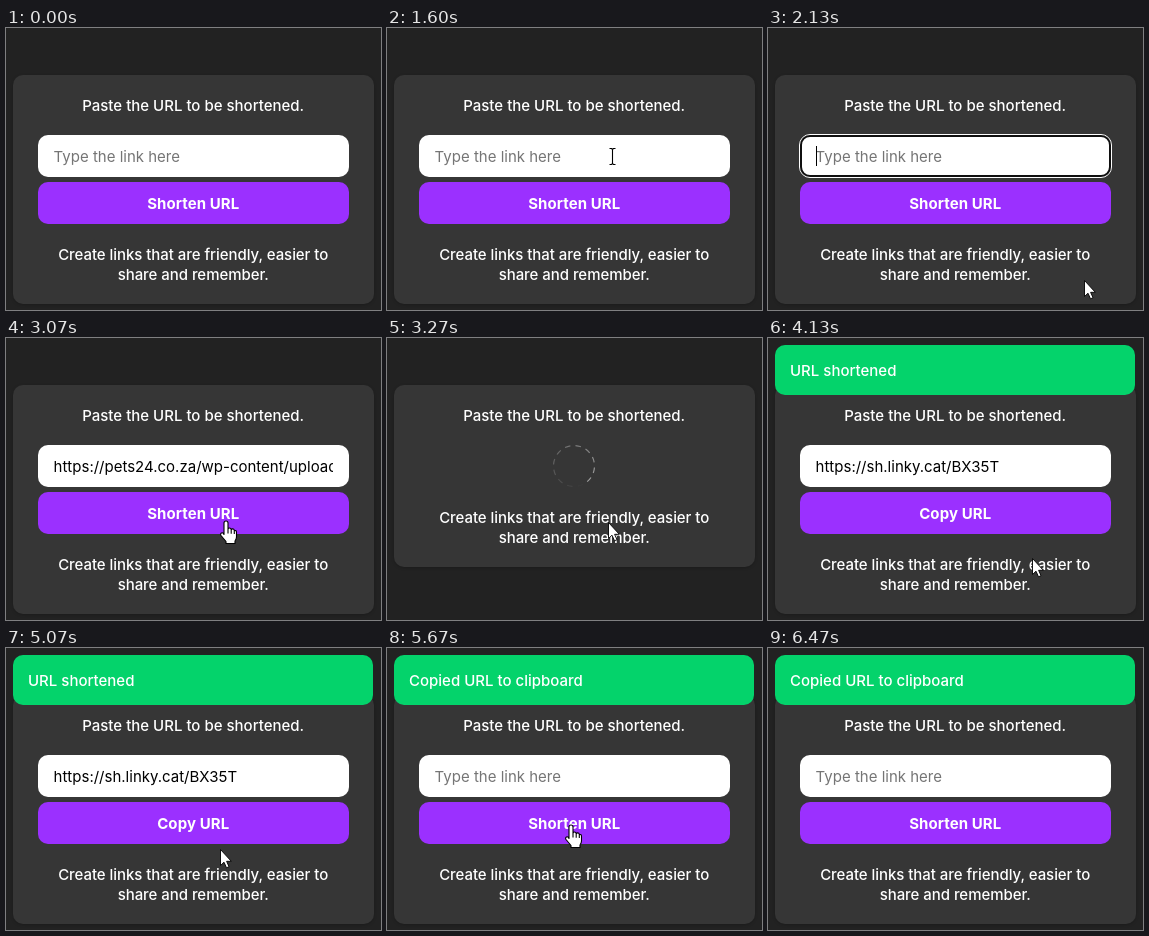
An HTML page for the animation above (7470 ms loop, 375 by 282 pixels).

```html
<!DOCTYPE html>
<html lang="en">
<head>
<meta charset="utf-8">
<title>URL shortener</title>
<style>
html, body { margin: 0; width: 100%; height: 100%; overflow: hidden; background: #222; }
svg { display: block; width: 375px; height: 282px; }
text { font: 500 15px Inter, "Open Sans", sans-serif; fill: #fff; }
.mid { text-anchor: middle; }
.bold { font-weight: 700; letter-spacing: .08px; }
#value { font-weight: 400; }
#note text { letter-spacing: -.05px; }
#panel { filter: drop-shadow(0 1px 1.5px rgba(0, 0, 0, .2)); }
</style>
</head>
<body>
<svg viewBox="0 0 375 282">
  <defs><clipPath id="inner"><rect x="47" y="108" width="280" height="40"/></clipPath></defs>
  <rect id="panel" x="7" y="47" width="361" height="229" rx="10" fill="#363636"/>
  <text class="mid" x="187.2" y="83">Paste the URL to be shortened.</text>
  <g id="form">
    <rect x="32" y="107" width="311" height="42" rx="10" fill="#fff"/>
    <g id="ring" fill="none">
      <rect x="31.5" y="106.5" width="312" height="43" rx="10.5" stroke="#fff"/>
      <rect x="33" y="108" width="309" height="40" rx="9" stroke="#101010" stroke-width="2"/>
    </g>
    <g clip-path="url(#inner)"><text id="value" x="47.6" y="134"></text></g>
    <rect id="caret" x="48" y="118" width="1" height="20" fill="#000"/>
    <rect x="32" y="154" width="311" height="42" rx="10" fill="#9b30ff"/>
    <text id="label" class="mid bold" x="187.2" y="181"></text>
  </g>
  <g id="spinner"></g>
  <g id="note">
    <text class="mid" x="187.2" y="232">Create links that are friendly, easier to</text>
    <text class="mid" x="187.2" y="252">share and remember.</text>
  </g>
  <g id="toast">
    <rect x="7" y="7" width="360" height="50" rx="10" fill="#04d36b"/>
    <text id="message" x="22" y="38"></text>
  </g>
  <g id="cursor">
    <path id="arrow" d="M.5 .5V16.5L4 13.2 6.5 18.8 9 17.7 6.6 12.3H11.3Z" fill="#fff" stroke="#000" stroke-width=".9"/>
    <path id="beam" d="M-3 -8H-1L0 -7 1 -8H3M0 -7V7M-3 8H-1L0 7 1 8H3" fill="none" stroke="#000" stroke-width="1.1"/>
    <path id="hand" d="M-3 1Q-3 -1 -1 -1T1 1V7.5Q1 6 2.5 6T4.2 7.8Q4.5 6.8 5.9 6.9T7.3 8.8Q9.5 7.9 9.5 10.5V15Q9.5 17 8 19V21.5H-1V19.5L-6 13.5Q-7 11.8 -5.5 11T-3 12.5Z M1 7.5V11.5M4.2 7.8V11.8M7.3 8.8V12.1" fill="#fff" stroke="#000" stroke-width="1.1" stroke-linejoin="round"/>
  </g>
</svg>
<script>
const LOOP = 7470, TICK = 200 / 3;
const $ = id => document.getElementById(id);
const show = (id, on) => { $(id).style.display = on ? "" : "none"; };

// Pointer stops: tick, x, y, ease out on arrival
const path = [
  [17, 262, 277], [24, 225, 128, 1], [27, 225, 128], [32, 316, 252, 1],
  [33, 317, 258], [39, 317, 258], [46, 221, 184, 1], [49, 221, 184],
  [57, 271, 239, 1], [61, 267, 230], [62, 264, 220], [71, 264, 220],
  [76, 214, 201], [81, 185, 178, 1], [85, 185, 178], [92, 243, 214, 1],
  [93, 243, 214], [97, 159, 300]
];

// Interface states: first tick, changes
const states = [
  [0, { value: "", label: "Shorten URL", message: "" }],
  [26, { ring: true, caret: true }],
  [34, { value: "https://pets24.co.za/wp-content/uploads", caret: false }],
  [46, { ring: false }],
  [48, { busy: true }],
  [62, { busy: false, value: "https://sh.linky.cat/BX35T", label: "Copy URL", message: "URL shortened" }],
  [84, { value: "", label: "Shorten URL", message: "Copied URL to clipboard" }]
];

// Dashed ring that fades behind its leading dash
const DASHES = 12, HEAD = 75;
for (let i = 0; i < DASHES; i++) {
  const dash = document.createElementNS("http://www.w3.org/2000/svg", "path");
  const angle = i * 360 / DASHES;
  const behind = (HEAD - angle + 360) % 360;
  dash.setAttribute("d", "M-2.8 -20.3Q0 -20.7 2.8 -20.3");
  dash.setAttribute("transform", `rotate(${angle})`);
  dash.setAttribute("fill", "none");
  dash.setAttribute("stroke", "#fff");
  dash.setAttribute("stroke-width", "1.2");
  dash.setAttribute("opacity", .55 * (1 - behind / 360));
  $("spinner").append(dash);
}

function pointer(k) {
  const i = path.findIndex(p => p[0] >= k);
  if (k < path[0][0] || i < 0) return null;
  const b = path[i], a = path[Math.max(0, i - 1)];
  let u = b === a ? 0 : (k - a[0]) / (b[0] - a[0]);
  if (b[3]) u *= 2 - u;
  return [a[1] + (b[1] - a[1]) * u, a[2] + (b[2] - a[2]) * u];
}

function drawPointer(k, busy) {
  const at = pointer(k);
  show("cursor", at);
  if (!at) return;
  const [x, y] = at.map(Math.round);
  const inside = (top, bottom) => !busy && x >= 32 && x < 343 && y >= top && y < bottom;
  const kind = inside(107, 149) ? "beam" : inside(154, 196) ? "hand" : "arrow";
  for (const id of ["arrow", "beam", "hand"]) show(id, id === kind);
  const half = kind === "beam" ? .5 : 0;
  $("cursor").setAttribute("transform", `translate(${x + half} ${y + half})`);
}

function draw(k) {
  const s = Object.assign({}, ...states.filter(e => e[0] <= k).map(e => e[1]));
  show("form", !s.busy);
  show("spinner", s.busy);
  show("ring", s.ring);
  show("caret", s.caret);
  show("toast", s.message);
  $("value").textContent = s.value || "Type the link here";
  $("value").style.fill = s.value ? "#000" : "#757575";
  $("label").textContent = s.label;
  $("message").textContent = s.message;
  $("panel").setAttribute("height", s.busy ? 182 : 229);
  $("note").setAttribute("transform", `translate(0 ${s.busy ? -47 : 0})`);
  $("spinner").setAttribute("transform", `translate(187 128) rotate(${(k - 61) * 24})`);
  drawPointer(k, s.busy);
}

const start = performance.now();
function frame() {
  const t = (performance.now() - start) % LOOP;
  draw(Math.floor((t + 4) / TICK) % 112);
  requestAnimationFrame(frame);
}
frame();
</script>
</body>
</html>
```
